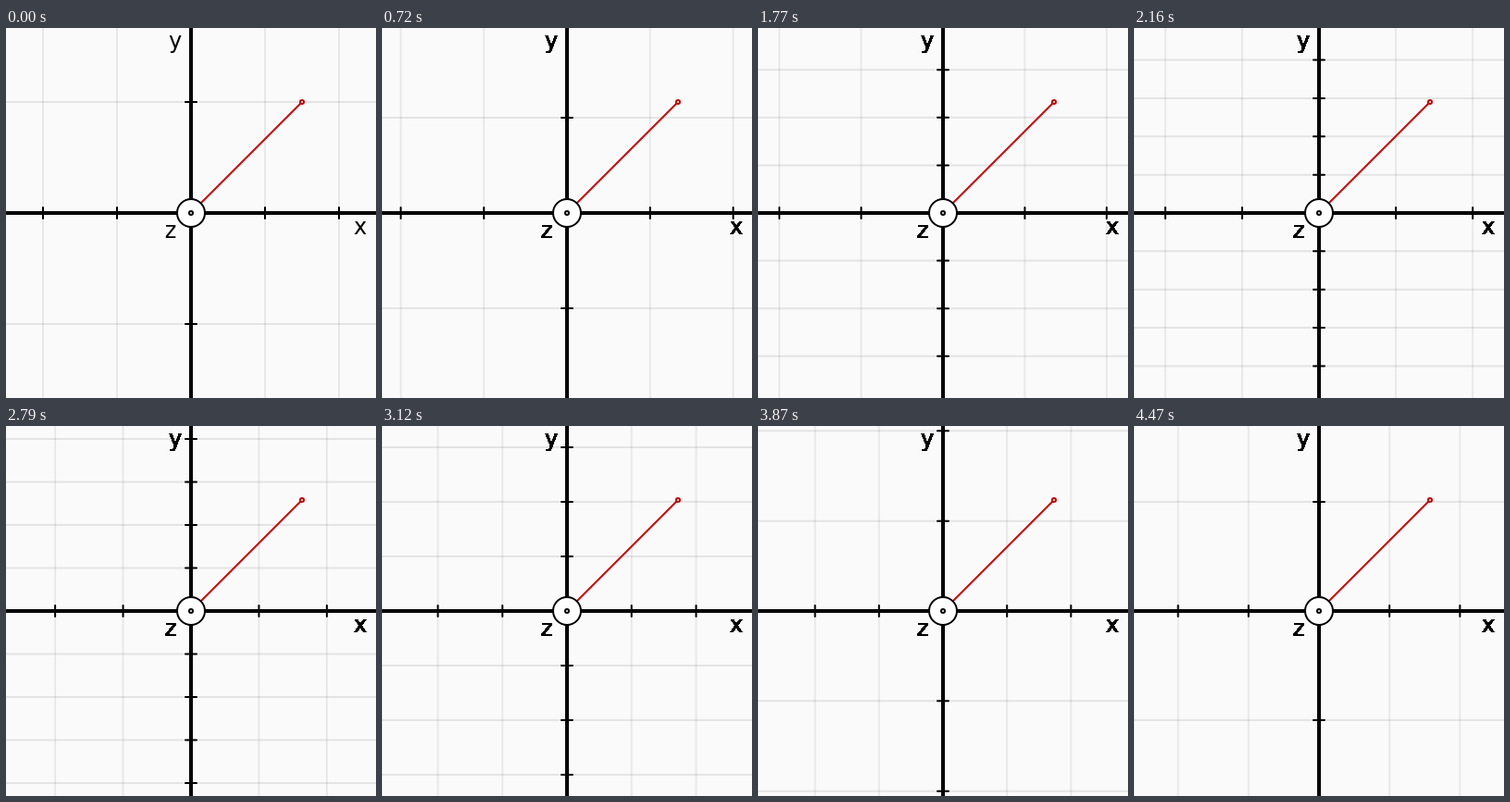
An HTML page with a canvas that plays this animation: 400 px wide and 400 px high, repeating every 4500 ms.

```html
<!DOCTYPE html>
<html>
<head>
<meta charset="utf-8">
<style>
  html, body { margin: 0; width: 100%; height: 100%; overflow: hidden; background: #fafafa; }
  canvas { display: block; }
</style>
</head>
<body>
<canvas id="stage" width="400" height="400"></canvas>
<script>
const ctx = document.getElementById('stage').getContext('2d');
const SIZE = 400, MID = SIZE / 2, STEP_MS = 30, STEPS = 150;
const start = performance.now();

function line(x1, y1, x2, y2, color, width, cap = 'butt') {
  ctx.strokeStyle = color;
  ctx.lineWidth = width;
  ctx.lineCap = cap;
  ctx.beginPath();
  ctx.moveTo(x1, y1);
  ctx.lineTo(x2, y2);
  ctx.stroke();
}

function ring(x, y, radius, color, fill) {
  ctx.beginPath();
  ctx.arc(x, y, radius, 0, 2 * Math.PI);
  ctx.fillStyle = fill;
  ctx.fill();
  ctx.strokeStyle = color;
  ctx.lineWidth = 2;
  ctx.stroke();
}

// Calls draw at every multiple of spacing on both sides of the centre.
function eachMark(spacing, draw) {
  for (let d = spacing; d <= MID + 1; d += spacing) {
    draw(MID - d);
    draw(MID + d);
  }
}

function draw(step) {
  const angle = step * 0.04;
  const unitX = 80 + 12 * Math.sin(angle);
  const unitY = 80 + 40 * Math.cos(angle);

  ctx.fillStyle = '#fafafa';
  ctx.fillRect(0, 0, SIZE, SIZE);

  eachMark(unitX, x => line(x, 0, x, SIZE, 'rgba(0,0,0,.07)', 2));
  eachMark(unitY, y => line(0, y, SIZE, y, 'rgba(0,0,0,.09)', 2));

  line(0, MID, SIZE, MID, '#000', 4);
  line(MID, 0, MID, SIZE, '#000', 4);
  eachMark(unitX, x => line(x, MID - 6, x, MID + 6, '#000', 2, 'round'));
  eachMark(unitY, y => line(MID - 6, y, MID + 6, y, '#000', 2, 'round'));

  line(MID, MID, 320, 80, '#c00', 2);
  ring(320, 80, 2, '#b00', '#fafafa');
  ring(MID, MID, 15, '#000', '#fff');
  ring(MID, MID, 2, '#000', '#fff');

  // Each step paints the labels over themselves, so their soft edges darken.
  ctx.font = '24px "DejaVu Sans", sans-serif';
  ctx.textAlign = 'center';
  ctx.fillStyle = '#000';
  for (let i = 0; i <= step; i++) {
    ctx.fillText('x', 383, 223);
    ctx.fillText('y', 183, 22);
    ctx.fillText('z', 178, 227);
  }
}

function tick() {
  draw(Math.floor((performance.now() - start) / STEP_MS) % STEPS);
  requestAnimationFrame(tick);
}
tick();
</script>
</body>
</html>
```
